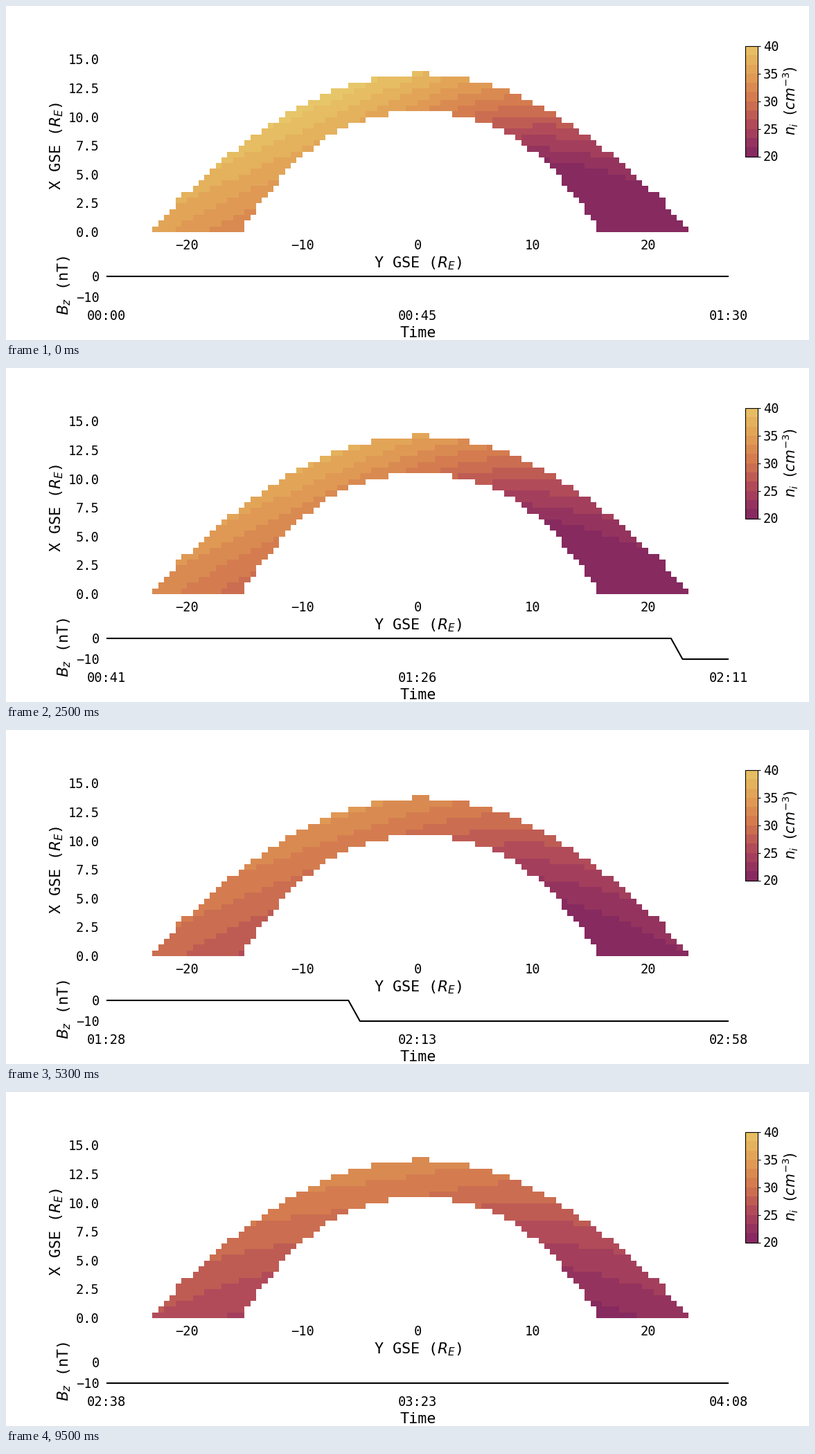
These frames come from a looping animation (1159 px wide and 483 px high, 9.6 s). A matplotlib script:

```python
import numpy as np
import matplotlib.pyplot as plt
from matplotlib.animation import FuncAnimation
from matplotlib.colors import LinearSegmentedColormap, ListedColormap
from matplotlib.patches import Rectangle

W, H, DPI = 1159, 483, 100
FRAMES, STEP_MS = 96, 100
UNIT, X0, Y0 = 16.64, 594, 327        # pixels per Earth radius, position of (0, 0)
LEFT, RIGHT = 145, 1043               # time axis
SPAN, DROP = 54, 74                   # steps in the window, step where Bz turns south
BANDS = 12
TICK, LABEL = 13.5, 15.7              # font sizes in points

plt.rcParams["font.family"] = "DejaVu Sans Mono"

fig = plt.figure(figsize=(W / DPI, H / DPI), dpi=DPI, facecolor="white")
ax = fig.add_axes([0, 0, 1, 1])
ax.set_xlim(0, W)
ax.set_ylim(H, 0)
ax.axis("off")


def label(x, y, s, size=TICK, ha="center", rot=0):
    return ax.text(x, y, s, size=size, ha=ha, va="baseline",
                   rotation=rot, rotation_mode="anchor")


ramp = LinearSegmentedColormap.from_list(
    "ramp", ["#862a60", "#ae475a", "#d1754e", "#e09c54", "#e6bd62"])
shades = ramp(np.linspace(0, 1, BANDS))
cmap = ListedColormap(shades).with_extremes(over="#e7c669")

# Half-degree cells; the sheath lies between two power-law arches
cols, rows = np.arange(-46, 47), np.arange(28)
y, x = np.meshgrid(cols / 2, rows / 2 + 0.25)


def half_width(nose, base, power):
    return base * np.clip(1 - x / nose, 0, 1) ** power


hidden = ((np.abs(y) > half_width(13.78, 23.58, 0.52))
          | ((np.abs(y) <= half_width(10.45, 15.6, 0.425)) & (x < 10.45)))

# Angle from the nose, and depth from inner (-0.5) to outer (0.5) boundary
theta = np.arctan2(y, x)
flare = 2 / (1 + np.cos(theta))
r_in, r_out = 10.5 * flare ** 0.538, 14 * flare ** 0.732
depth = (np.hypot(y, x) - r_in) / (r_out - r_in) - 0.5


def density(n):
    # slow turning of the field, with a quick drop when Bz first turns
    turn = np.clip((n - DROP + SPAN) / (SPAN + 1), 0, 1)
    drop = min(turn * 11, 1)
    flank = 25.5 - drop - 0.9 * turn + (4 - 2 * turn) * depth
    nose = (10.75 - 1.6 * drop - 1.3 * turn - 1.1 * np.sin(np.pi * turn)
            + (1.5 - 0.5 * turn) * depth)
    tilt = 8.2 - 1.5 * drop - 4.8 * turn
    v = flank + nose * np.cos(theta) - tilt * np.sin(theta)
    return np.ma.array(v, mask=hidden)


mesh = ax.pcolormesh(X0 + UNIT * np.arange(-46, 48) / 2,
                     Y0 - UNIT * np.arange(29) / 2,
                     density(0), cmap=cmap, vmin=20, vmax=40,
                     antialiased=False, linewidth=0)

# Map axes
for k in range(7):
    label(134.7, Y0 - 2.5 * k * UNIT + 7, f"{2.5 * k:.1f}", ha="right")
for k in range(-20, 21, 10):
    label(X0 + k * UNIT, 352.5, str(k).replace("-", "\u2212"))
label(595, 378.5, "Y GSE ($R_E$)", LABEL)
label(79, 202, "X GSE ($R_E$)", LABEL, rot=90)

# Colour bar
top, bottom = 58, 217.5
edges = np.linspace(bottom, top, BANDS + 1)
for c, lo, hi in zip(shades, edges, edges[1:]):
    ax.add_patch(Rectangle((1066.5, hi), 18, lo - hi, fc=c, lw=0,
                           antialiased=False))
ax.add_patch(Rectangle((1066.5, top), 18, bottom - top, fill=False,
                       ec="black", lw=0.8))
for v in range(20, 41, 5):
    ty = bottom - (v - 20) / 20 * (bottom - top)
    ax.plot([1084.5, 1089.4], [ty, ty], color="black", lw=0.8,
            solid_capstyle="butt")
    label(1093, ty + 7, str(v), ha="left")
label(1140.5, 137, "$n_i$ $(cm^{-3})$", 14.8, rot=90)

# Bz strip
label(134.7, 398, "0", ha="right")
label(134.7, 428, "\u221210", ha="right")
label(90, 404, "$B_z$ (nT)", LABEL, rot=90)
label(594.5, 479, "Time", LABEL)
bz, = ax.plot([], [], color="black", lw=1.5)
bz.set_clip_path(Rectangle((LEFT, 380), RIGHT - LEFT, 50,
                           transform=ax.transData))
clocks = [label(cx, 454, "") for cx in (LEFT, (LEFT + RIGHT) / 2, RIGHT)]

steps = np.arange(FRAMES + SPAN + 1)
level = np.where(steps <= DROP, 391, 421)


def update(n):
    mesh.set_array(density(n))
    bz.set_data(LEFT + (steps - n) * (RIGHT - LEFT) / SPAN, level)
    for k, clock in enumerate(clocks):
        m = n * 5 // 3 + 45 * k
        clock.set_text(f"{m // 60:02d}:{m % 60:02d}")
    return [mesh, bz, *clocks]


anim = FuncAnimation(fig, update, frames=FRAMES, interval=STEP_MS,
                     init_func=lambda: update(0), repeat=True, repeat_delay=0)
plt.show()
```
